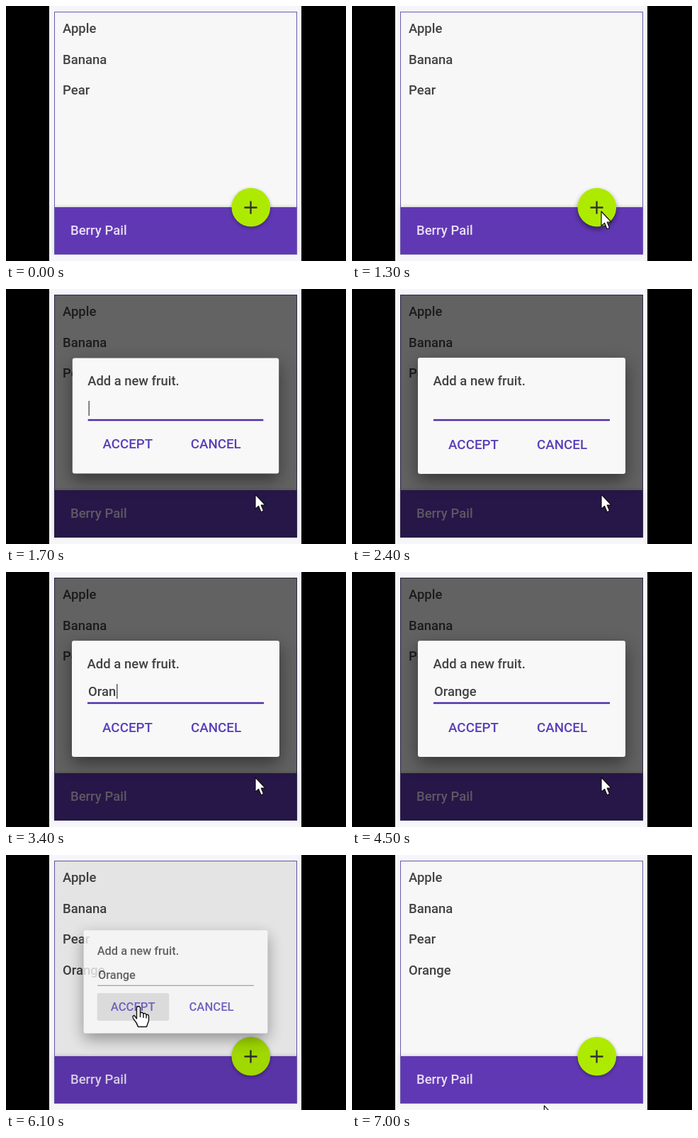
An HTML page that plays this animation: 480 by 360 pixels, repeating every 7.1 s.

```html
<!DOCTYPE html>
<html lang="en">
<head>
<meta charset="utf-8">
<title>Add a fruit</title>
<style>
  html, body { margin: 0; width: 100%; height: 100%; overflow: hidden; background: #000; }
  svg { display: block; width: 100vw; height: 100vh; }
  text { font: 500 18.5px Roboto, sans-serif; fill: #424242; }
  .button { font-size: 18.8px; fill: #5a3fb8; text-anchor: middle; }
  #dialog { filter: drop-shadow(0 9px 12px rgba(0, 0, 0, .45)); }
</style>
</head>
<body>
<svg viewBox="0 0 480 360">
  <rect width="480" height="360"/>
  <rect x="61" width="356" height="360" fill="#f6f6fa"/>
  <rect x="68.5" y="8.5" width="342" height="342" fill="#f7f7f7"/>
  <text x="80" y="38">Apple</text>
  <text x="80" y="82">Banana</text>
  <text x="80" y="125">Pear</text>
  <text x="80" y="169" id="added">Orange</text>
  <rect x="68" y="284" width="343" height="67" fill="#6138b4" style="filter:drop-shadow(0 -1px 2px rgba(0,0,0,.15))"/>
  <text x="91" y="323" style="fill:#e8def6">Berry Pail</text>
  <rect x="68.5" y="8.5" width="342" height="342" fill="none" stroke="#6a58ac"/>
  <g id="fab">
    <circle cx="345.8" cy="284.3" r="27.3" fill="#aeea00"/>
    <path d="M336.5 284.5h18M345.5 275.5v18" stroke="#303030" stroke-width="2.3"/>
  </g>
  <rect id="shade" x="68" y="8" width="343" height="343"/>
  <g id="dialog">
    <rect x="93" y="97" width="293" height="164" rx="3" fill="#f8f8f8"/>
    <text x="114.5" y="136">Add a new fruit.</text>
    <text x="116" y="175" id="entry"></text>
    <path id="caret" d="M0 158v21" stroke="#444" stroke-width="1.3"/>
    <path id="line" d="M115 185h249"/>
    <rect id="press" x="114.5" y="197" width="114.5" height="44" rx="3" fill="#d9d9d9"/>
    <text x="171.5" y="225.5" class="button">ACCEPT</text>
    <text x="296.5" y="225.5" class="button">CANCEL</text>
  </g>
  <g id="cursor" stroke-linejoin="round">
    <path id="arrow" d="M0 0V20.5L4.6 16.5L8 24.8L11.6 23.2L8.2 15H14Z" fill="#fff" stroke="#111" stroke-width="1.2"/>
    <g id="hand" fill="#fff" stroke="#111" stroke-width="1.4">
      <path d="M-2.5 18V2.5Q0 -1.5 2.5 2.5V10Q5 8 7 11Q9.500 9.500 11 12.500Q14.500 11.500 14.500 15V21Q13 25 11.500 29.500H-.5Q-2 24 -7 18.500Q-9.500 14 -6 13.500Z"/>
      <path d="M2.500 10v6M7 11v6M11 12.500v5" fill="none"/>
    </g>
  </g>
</svg>
<script>
const LOOP = 7100, WORD = 'Orange';
const OPEN = 1380, CLOSE = 6000, PRESS = 5800;
const keyTimes = [2800, 3000, 3200, 3400, 3600, 3900];
const path = [[300, 378, 366], [1000, 352, 290], [4600, 352, 290],
              [5450, 187, 213], [6500, 187, 213], [7100, 278, 365]];

const $ = id => document.getElementById(id);
const progress = (t, start, length) => Math.min(1, Math.max(0, (t - start) / length));
const smooth = p => p * p * (3 - 2 * p);
const show = (id, on) => $(id).setAttribute('visibility', on ? 'visible' : 'hidden');
const set = (id, attrs) => {
  for (const name in attrs) $(id).setAttribute(name, attrs[name]);
};

function cursorAt(t) {
  let [, x, y] = path[0];
  for (let i = 1; i < path.length; i++) {
    const [start, x0, y0] = path[i - 1], [end, x1, y1] = path[i];
    const p = smooth(progress(t, start, end - start));
    x += (x1 - x0) * p;
    y += (y1 - y0) * p;
  }
  return [x, y];
}

function draw(t) {
  const open = 1 - (1 - progress(t, OPEN, 390)) ** 3;
  const close = progress(t, CLOSE, 300);
  const closing = t >= CLOSE;

  // dialog and backdrop
  const scale = closing ? 1 - close ** 2 : open;
  set('dialog', {
    transform: `translate(239.5 179) scale(${scale}) translate(-239.5 -179)`,
    opacity: closing ? 1 - close ** 1.5 : Math.min(1, open * 1.3)
  });
  $('dialog').style.display = scale > 0 ? '' : 'none';
  set('shade', { opacity: .6 * open * (1 - close) ** 5 });

  // floating button
  const lift = closing ? 0 : smooth(progress(t, 1100, 200));
  set('fab', { opacity: closing ? Math.min(1, close * 3) : (1 - open) ** 1.7 });
  $('fab').style.filter =
    `drop-shadow(0 ${2 + lift * 2}px ${2.5 + lift}px rgba(0,0,0,${.35 + lift * .1}))`;

  // text entry
  const typed = keyTimes.filter(k => t >= k);
  const lastKey = typed.length ? typed[typed.length - 1] : 1450;
  const focused = t < PRESS;
  $('entry').textContent = WORD.slice(0, typed.length);
  const caretX = 116.5 + (typed.length ? $('entry').getComputedTextLength() + 1 : 0);
  set('caret', { transform: `translate(${caretX} 0)` });
  show('caret', focused && t >= OPEN && (t - lastKey) % 1000 < 500);
  set('line', { stroke: focused ? '#512da8' : '#777', 'stroke-width': focused ? 2.5 : 1.2 });
  set('press', { opacity: progress(t, PRESS, 150) });
  show('added', closing);

  // pointer
  const [x, y] = cursorAt(t);
  const overButton = t > OPEN && t < CLOSE + 300 && x < 229 && y < 241;
  set('cursor', { transform: `translate(${x} ${y})` });
  show('arrow', !overButton);
  show('hand', overButton);
}

const began = performance.now();
function tick() {
  draw((performance.now() - began) % LOOP);
  requestAnimationFrame(tick);
}
tick();
</script>
</body>
</html>
```
